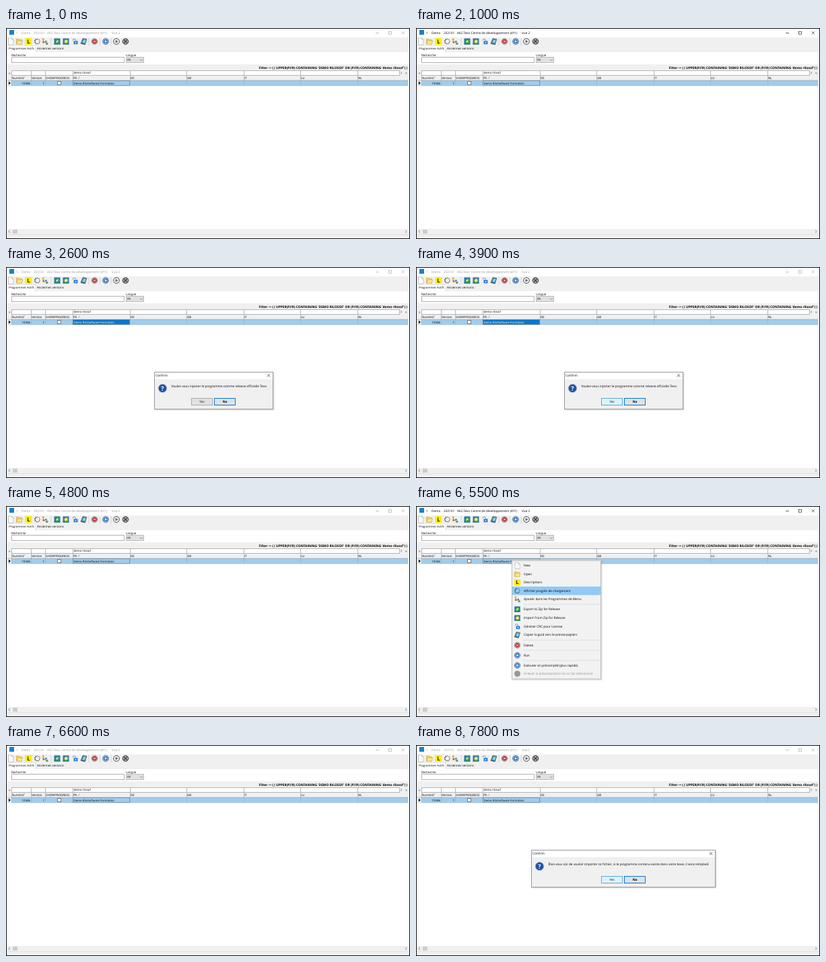
An HTML page with a canvas that plays this animation: 600x314 px, repeating every 8000 ms.

```html
<!DOCTYPE html>
<html lang="fr">
<head>
<meta charset="utf-8">
<style>
html, body { margin: 0; width: 100%; height: 100%; overflow: hidden; background: #fff; }
canvas { display: block; width: 600px; height: 314px; }
</style>
</head>
<body>
<canvas id="stage" width="600" height="314"></canvas>
<script>
const ctx = document.getElementById('stage').getContext('2d');
ctx.textRendering = 'geometricPrecision';
const LOOP = 8000;
const FACE = '#f0f0f0', BLUE = '#0078d7', ROW = '#a0ccee';
const COLS = [8, 37, 58, 99, 184, 268, 353, 437, 522, 584];

function rect(x, y, w, h, fill, stroke) {
  if (fill) { ctx.fillStyle = fill; ctx.fillRect(x, y, w, h); }
  if (stroke) {
    ctx.strokeStyle = stroke;
    ctx.lineWidth = 1;
    ctx.strokeRect(x + 0.5, y + 0.5, w - 1, h - 1);
  }
}

function text(str, x, y, { size = 4.45, color = '#000', align = 'left', bold = false } = {}) {
  ctx.font = `${bold ? 'bold ' : ''}${size}px "Open Sans", "Noto Sans", sans-serif`;
  ctx.fillStyle = color;
  ctx.textAlign = align;
  ctx.textBaseline = 'alphabetic';
  ctx.fillText(str, x, y + size * 0.36);
}

function path(points, color, width = 0.8, fill) {
  ctx.beginPath();
  points.forEach(([x, y], i) => i ? ctx.lineTo(x, y) : ctx.moveTo(x, y));
  if (fill) { ctx.closePath(); ctx.fillStyle = fill; ctx.fill(); }
  if (color) { ctx.strokeStyle = color; ctx.lineWidth = width; ctx.stroke(); }
}

function disc(x, y, r, fill, stroke, width = 1) {
  ctx.beginPath();
  ctx.arc(x, y, r, 0, Math.PI * 2);
  if (fill) { ctx.fillStyle = fill; ctx.fill(); }
  if (stroke) { ctx.strokeStyle = stroke; ctx.lineWidth = width; ctx.stroke(); }
}

function cross(x, y, r, color, width) {
  path([[x - r, y - r], [x + r, y + r]], color, width);
  path([[x + r, y - r], [x - r, y + r]], color, width);
}

function play(ring, fill, arrow) {
  disc(0, 0, 4.4, '#e8eef4', ring, 0.9);
  disc(0, 0, 3.3, fill);
  path([[-1.2, -2.1], [2.2, 0], [-1.2, 2.1]], null, 0, arrow);
}

function zip(arrow) {
  rect(-4.5, -4.5, 9, 9, '#2a78ac');
  rect(-4.5, 2.5, 9, 2, '#2c8a62');
  disc(0.3, 0, 2.8, arrow);
  path([[-1.2, 1.2], [1.2, -1.2]], '#fff', 1.4);
}

const ICONS = {
  page() {
    path([[-3.5, -5], [1.5, -5], [4, -2.5], [4, 5], [-3.5, 5]], '#b5b5b5', 0.7, '#fafafa');
    path([[1.5, -5], [1.5, -2.5], [4, -2.5]], '#b5b5b5', 0.6);
  },
  folder() {
    path([[-4.5, 4], [-4.5, -3.5], [-1, -3.5], [0, -2.5], [3.5, -2.5], [3.5, 4]], '#c9a13a', 0.6, '#efcf63');
    path([[-4.5, 4], [-2, -1], [5, -1], [3, 4]], '#cfa93c', 0.6, '#fce694');
  },
  label() {
    rect(-5, -5, 10, 10, '#ffee00');
    text('L', 0, 0, { size: 8, bold: true, align: 'center', color: '#222' });
  },
  spinner() {
    for (let i = 0; i < 9; i++) {
      const a = i * Math.PI * 2 / 9 - 1.5;
      disc(Math.cos(a) * 3.6, Math.sin(a) * 3.6, 0.6 + i * 0.04, '#2a2a2a');
    }
  },
  tree() {
    path([[-3, -3], [-2.5, 1], [2.5, 3]], '#888', 0.7);
    rect(-4.2, -4.5, 3, 3, '#e2b92c');
    rect(-3.5, -0.2, 2.6, 2.6, '#d0503f');
    rect(0.2, -1, 2.4, 2.4, '#3b78c0');
    rect(1.4, 1.8, 3, 3, '#49a552');
  },
  exportZip() { zip('#3fae49'); },
  importZip() { zip('#d9c63c'); },
  lock() {
    ctx.beginPath();
    ctx.arc(-1.2, -1.5, 2.2, Math.PI, Math.PI * 2.05);
    ctx.strokeStyle = '#7b8fa8'; ctx.lineWidth = 1; ctx.stroke();
    rect(-2, -0.8, 6, 5, '#2f7ed8');
    rect(0.4, 0.8, 1.2, 2, '#fff');
  },
  copy() {
    path([[-4.5, 3], [-1.5, -4.5], [4.5, -3.5], [2, 4.5]], '#46616d', 0.6, '#3b8a9f');
    path([[-2, 1.5], [-0.2, -2.6], [3, -2], [1.3, 2.4]], null, 0, '#9ad3e2');
    path([[-4.5, 3.2], [2, 4.6]], '#444', 0.9);
  },
  remove() {
    disc(0, 0, 4.3, '#d8c4c4', '#857878', 0.9);
    disc(0, 0, 3.3, '#bf2a30');
    cross(0, 0, 1.5, '#fff', 1);
  },
  run() { play('#2b5f94', '#2d74b8', '#fff'); },
  runBlack() { play('#444', '#e4e4e4', '#555'); },
  stop() {
    disc(0, 0, 4.3, '#aaa', '#333', 1);
    cross(0, 0, 2.6, '#333', 1.1);
  },
  none() { disc(0, 0, 4.3, '#999', '#858585', 0.6); }
};

function icon(name, x, y, scale = 1) {
  ctx.save();
  ctx.translate(x, y);
  ctx.scale(scale, scale);
  ICONS[name]();
  ctx.restore();
}

const TOOLS = [['page', 7], ['folder', 20], ['label', 33.5], ['spinner', 46.5], ['tree', 58],
  ['exportZip', 76], ['importZip', 89], ['lock', 102.5], ['copy', 115.5], ['remove', 131.5],
  ['run', 148], ['runBlack', 164], ['stop', 177.5]];

// Offsets are measured from the top of the menu.
const MENU = [
  ['page', 'New', 8], ['folder', 'Open', 20.5], ['label', 'Descripitons', 33],
  ['spinner', 'Afficher progrès de chargement', 45.5],
  ['tree', 'Ajouter dans les Programmes de Menu', 58],
  ['exportZip', 'Export to Zip for Release', 73], ['importZip', 'Import From Zip for Release', 86],
  ['lock', 'Générer CRC pour License', 98.5], ['copy', 'Copier la guid vers le presse-papiers', 111],
  ['remove', 'Delete', 126.5], ['run', 'Run', 141.5],
  ['run', 'Exécuter en précompilé (plus rapide)', 156.5],
  ['none', 'Enlever la précompilation du script sélectionné', 169]
];
const RULES = [65.5, 119, 134, 149];

function titleBar(active) {
  const color = active ? '#000' : '#999';
  rect(0, 0, 600, 14, '#fff');
  rect(5, 3, 7, 7, '#1583c7');
  [['1', 15], ['Demo', 23], ['202101', 41], ['4K2.Tevo Centre de développement (4Y1)', 61], ['Vue 2', 157]]
    .forEach(([s, x]) => text(s, x, 7, { size: 4.72, color }));
  path([[549, 7.5], [554, 7.5]], color, 0.6);
  ctx.strokeRect(568.5, 5.2, 4, 4);
  cross(589.8, 7.2, 2.1, color, 0.6);
}

function toolbar() {
  rect(0, 14, 600, 22, FACE);
  TOOLS.forEach(([name, x]) => icon(name, x, 20));
  [67, 123, 139.5, 156].forEach(x => path([[x, 15], [x, 26]], '#c4c4c4', 0.6));
}

function searchPanel() {
  rect(2, 26, 42, 11, '#fff');
  path([[2, 36], [2, 26.5], [44, 26.5], [44, 36]], '#d5d5d5', 0.6);
  text('Programmes Actifs', 4.2, 30.8, { size: 4.3 });
  text('Anciennes versions', 46, 30.8);
  rect(1, 36, 598, 18, '#fff');
  text('Recherche', 8, 40.3);
  text('Langue', 178, 40.3);
  rect(8, 43, 168, 9, '#fff', '#b0b0b0');
  rect(178, 43, 27, 9, '#e1e1e1', '#bdbdbd');
  text('FR', 180, 47.8);
  path([[199, 46.7], [201, 48.7], [203, 46.7]], '#555', 0.6);
  rect(1, 54, 598, 9, FACE);
  text("Filter -> ( ( UPPER(P.FR) CONTAINING 'DEMO RILOSOF' OR (P.FR) CONTAINING 'demo rilosof') )",
    596, 58.8, { size: 4.85, bold: true, align: 'right' });
}

function grid(focused) {
  rect(1, 63, 598, 236, '#fff');
  rect(1, 63, 598, 15, FACE);
  for (let i = 0; i < COLS.length - 1; i++) {
    rect(COLS[i], 63, COLS[i + 1] - COLS[i] + 1, 8, '#fff', '#b4b4b4');
  }
  text('×', 4, 67, { size: 4.5 });
  text('?', 586, 67, { size: 4.7 });
  text('×', 593, 67, { size: 4.7 });
  text('demo rilosof', 100.5, 66.8, { size: 4.3 });
  ['Numéro', 'Version', 'SHOWPROGRESS', 'FR', 'DE', 'GB', 'IT', 'LU', 'NL']
    .forEach((s, i) => text(s, COLS[i] + 1, 74.3));
  for (let i = 0; i < 3; i++) path([[25, 72.5 + i * 1.5], [29 - i, 72.5 + i * 1.5]], '#999', 0.5);
  path([[106, 75], [109, 75], [109, 72]], '#999', 0.6);

  rect(1, 78, 7, 8, FACE);
  path([[4, 79.5], [7, 82], [4, 84.5]], null, 0, '#111');
  rect(8, 78, 589, 8, ROW);
  COLS.slice(0, -1).forEach(x => {
    path([[x + 0.5, 71], [x + 0.5, 78]], '#aaa', 0.7);
    path([[x + 0.5, 78], [x + 0.5, 86]], '#8aaec8', 0.5);
  });
  path([[1, 78], [597, 78]], '#999', 0.6);
  path([[1, 86], [597, 86]], '#aab8c2', 0.5);
  text('10346', 36, 82, { align: 'right' });
  text('1', 57, 82, { align: 'right' });
  rect(76, 79, 6, 6, '#fff', '#777');
  if (focused) rect(99, 78, 85, 8, BLUE);
  ctx.setLineDash([1, 1]);
  rect(99, 78, 85, 8, null, focused ? '#d48a3a' : '#4e6c82');
  ctx.setLineDash([]);
  text('Demo RiloSoftware Formation', 100.5, 82, { size: 4.3, color: focused ? '#fff' : '#000' });
}

function frameAndScroll() {
  rect(1, 299, 598, 15, FACE);
  rect(10, 300, 7, 6, '#cdcdcd');
  path([[6, 301], [4, 303], [6, 305]], '#777', 0.8);
  path([[593, 301], [595, 303], [593, 305]], '#777', 0.8);
  path([[0, 307.5], [600, 307.5]], '#d8d8d8', 0.6);
  rect(0, 0, 600, 314, null, '#111');
}

function shadow(x, y, w, h) {
  ctx.save();
  ctx.shadowColor = 'rgba(0,0,0,0.2)';
  ctx.shadowBlur = 2;
  ctx.shadowOffsetX = ctx.shadowOffsetY = 1;
  rect(x, y, w, h, '#fff');
  ctx.restore();
}

function menu(x, y, hot, alpha) {
  ctx.save();
  ctx.globalAlpha = alpha;
  shadow(x, y, 133, 177);
  rect(x, y, 133, 177, '#f2f2f2', '#bbb');
  if (hot >= 0) rect(x + 1, y + MENU[hot][2] - 6.3, 131, 12.6, '#91c9f7');
  RULES.forEach(d => path([[x + 17, y + d], [x + 131, y + d]], '#cfcfcf', 0.6));
  MENU.forEach(([name, label, d]) => {
    icon(name, x + 8.5, y + d, 0.95);
    text(label, x + 18, y + d, { size: 4.73, color: name === 'none' ? '#909090' : '#000' });
  });
  ctx.restore();
}

function button(label, x, hover, main) {
  rect(x, 195, 32, 11, hover ? '#e0f1fa' : '#e1e1e1', main ? BLUE : hover ? '#5ba9d6' : '#adadad');
  text(label, x + 16, 200.5, { size: 4.72, align: 'center', bold: main });
}

function dialog({ x, w, message, hover, alpha }) {
  ctx.save();
  ctx.globalAlpha = alpha;
  shadow(x, 156, w, 56);
  rect(x, 156, w, 56, FACE, '#999');
  rect(x + 1, 157, w - 2, 10, '#fff');
  text('Confirm', x + 2, 161.5, { size: 4.72 });
  cross(x + w - 7, 161.5, 2.2, '#333', 0.7);
  disc(x + 12.5, 180.5, 6.2, '#1d50a8', '#a9b4c4', 0.9);
  text('?', x + 12.5, 180.5, { size: 9, bold: true, align: 'center', color: '#fff' });
  text(message, x + 25.5, 177, { size: 4.72 });
  button('Yes', 275, hover === 'yes', false);
  button('No', 309, hover === 'no', true);
  ctx.restore();
}

// Last value whose start time has passed.
const at = (t, steps) => steps.reduce((v, [start, value]) => t >= start ? value : v, null);

const ACTIVE = [[0, false], [1000, true], [2400, false], [5200, true], [6400, false]];
const MENUS = [
  { x: 170, y: 83, from: 1100, to: 2200,
    hot: [[1100, -1], [1300, 0], [1400, 1], [1500, 2], [1700, 3], [1800, 5], [1900, 6], [2000, 5]] },
  { x: 142, y: 80.7, from: 5200, to: 6400,
    hot: [[5200, -1], [5300, 1], [5400, 2], [5500, 3], [5600, 4], [5700, 5], [5900, 6]] }
];
const DIALOGS = [
  { x: 220, w: 177, from: 2400, to: 4500,
    message: 'Voulez-vous injecter le programme comme release officielle Tevo',
    hover: [[3300, 'no'], [3600, 'yes']] },
  { x: 171, w: 274, from: 6800, to: 9000,
    message: 'Êtes-vous sûr de vouloir importer ce fichier, si le programme contenu existe dans votre base, il sera remplacé',
    hover: [[7300, 'no'], [7500, null], [7800, 'yes']] }
];

function draw(t) {
  titleBar(at(t, ACTIVE));
  toolbar();
  searchPanel();
  grid(t >= 2400 && t < 4400);
  frameAndScroll();
  for (const m of MENUS) {
    if (t >= m.from && t < m.to) menu(m.x, m.y, at(t, m.hot), t < m.from + 100 ? 0.6 : 1);
  }
  for (const d of DIALOGS) {
    if (t < d.from || t >= d.to) continue;
    const fadeIn = at(t - d.from, [[0, 0.4], [100, 0.85], [200, 1]]);
    dialog({ ...d, hover: at(t, d.hover), alpha: t >= d.to - 100 ? 0.5 : fadeIn });
  }
}

const start = performance.now();
function tick() {
  draw((performance.now() - start) % LOOP);
  requestAnimationFrame(tick);
}
tick();
</script>
</body>
</html>
```
